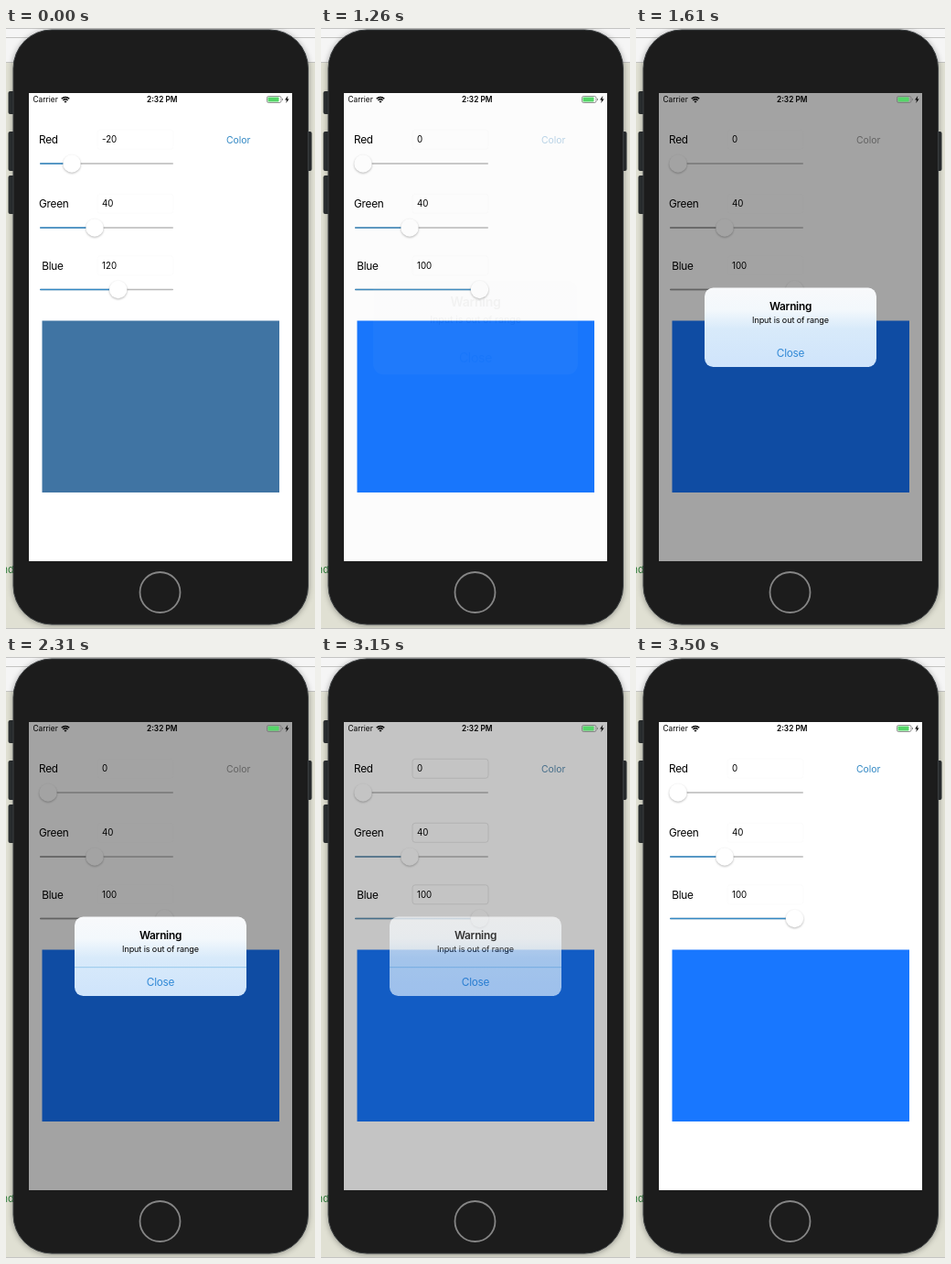
An HTML page that plays this animation: 338 by 656 pixels, repeating every 3640 ms.

```html
<!DOCTYPE html>
<html lang="en">
<head>
<meta charset="utf-8">
<title>Color sliders</title>
<style>
  @property --done { syntax: "<number>"; inherits: true; initial-value: 0; }
  @property --show { syntax: "<number>"; inherits: true; initial-value: 0; }
  @property --zoom { syntax: "<number>"; inherits: true; initial-value: 1.2; }
  @property --gray { syntax: "<number>"; inherits: true; initial-value: 0; }
  @property --press { syntax: "<number>"; inherits: true; initial-value: 1; }
  @property --edge { syntax: "<number>"; inherits: true; initial-value: 0.1; }
  @property --line { syntax: "<number>"; inherits: true; initial-value: 0; }

  html, body { margin: 0; width: 100%; height: 100%; overflow: hidden; }

  /* The screen redraws every 70 ms, so each value is held until the next. */
  svg {
    display: block; width: 100%; height: 100%;
    font-family: Inter, sans-serif;
    --tint: color-mix(in srgb, #999 calc(var(--gray) * 100%), #3288c4);
    animation: play 3640ms step-end infinite;
  }
  @keyframes play {
    0%      { --done: 0; --show: 0; --zoom: 1.2; --gray: 0; --press: 1; --edge: .1; --line: 0; }
    28.846% { --press: .35; }                                            /* 1050 ms */
    34.615% { --done: 1; --show: .03; --zoom: 1.19; --gray: .1; --press: .35; --edge: .1; }
    36.538% { --done: 1; --show: .29; --zoom: 1.14; --gray: .6; --press: .5; --edge: .4; }
    38.462% { --done: 1; --show: .62; --zoom: 1.07; --gray: .85; --press: .8; --edge: .4; }
    40.385% { --done: 1; --show: .87; --zoom: 1.02; --gray: 1; --press: 1; --edge: .2; }
    42.308% { --done: 1; --show: 1; --zoom: 1; --gray: 1; --press: 1; --edge: .1; --line: 0; }
    46.154% { --done: 1; --show: 1; --zoom: 1; --gray: 1; --press: 1; --edge: .1; --line: 1; }
    84.615% { --done: 1; --show: 1; --zoom: 1; --gray: 1; --press: 1; --edge: .2; --line: 1; }
    86.538% { --done: 1; --show: .64; --zoom: 1; --gray: .4; --press: 1; --edge: .8; --line: 1; }
    88.462% { --done: 1; --show: .31; --zoom: 1; --gray: 0; --press: 1; --edge: 1; --line: 1; }
    90.385% { --done: 1; --show: .13; --zoom: 1; --gray: 0; --press: 1; --edge: .7; --line: 1; }
    92.308% { --done: 1; --show: .05; --zoom: 1; --gray: 0; --press: 1; --edge: .4; --line: 1; }
    94.231%, 100% { --done: 1; --show: 0; --zoom: 1; --gray: 0; --press: 1; --edge: .1; --line: 1; }
  }

  .label { font-size: 11.8px; letter-spacing: -.25px; }
  .value { font-size: 9.74px; }
  .status { font-size: 8.35px; }
  .before { opacity: calc(1 - var(--done)); }
  .after { opacity: var(--done); }
  .field { fill: none; stroke: #e2e2e2; opacity: var(--edge); }
  .fill { fill: var(--tint); width: calc((var(--from) + (var(--to) - var(--from)) * var(--done) - 37) * 1px); }
  .thumb {
    fill: #fff;
    transform: translateX(calc((var(--from) + (var(--to) - var(--from)) * var(--done)) * 1px));
    filter: drop-shadow(0 1px .8px rgba(0, 0, 0, .28));
  }
  .color { font-size: 10.4px; fill: var(--tint); opacity: var(--press); }
  .swatch { fill: color-mix(in srgb, #1877ff calc(var(--done) * 100%), #4074a3); }
  .dim { opacity: calc(var(--show) * .36); }
  .alert {
    opacity: min(1, calc(var(--show) * 1.15));
    transform: scale(var(--zoom)); transform-origin: 169px 326.7px;
    text-anchor: middle;
  }
  .rule { opacity: var(--line); }
  .body { filter: drop-shadow(0 1px 3px rgba(0, 0, 0, .35)); }
</style>
</head>
<body>
<svg viewBox="0 0 338 656" preserveAspectRatio="none">
  <defs>
    <linearGradient id="glass" x2="0" y2="1">
      <stop offset="0" stop-color="#f8f9fb"/>
      <stop offset=".28" stop-color="#f3f8fc"/>
      <stop offset=".52" stop-color="#d8eafa"/>
      <stop offset="1" stop-color="#cfe4fb"/>
    </linearGradient>
  </defs>

  <rect width="338" height="656" fill="#e0e0d3"/>
  <rect width="338" height="37" fill="#f5f5f5"/>
  <path d="M0 .5H338M0 10.5H338M0 37.5H338M0 655.5H338" stroke="#c4c4c2"/>
  <text x="-4.5" y="595" font-size="11" fill="#2f7d3a">nd</text>

  <g fill="#2c3032">
    <rect x="2.5" y="69" width="8" height="25" rx="2"/>
    <rect x="2.5" y="113" width="8" height="43" rx="2"/>
    <rect x="2.5" y="161" width="8" height="42" rx="2"/>
    <rect x="328" y="113" width="6.5" height="43" rx="2"/>
  </g>
  <rect class="body" x="8" y="2" width="322.5" height="649" rx="42" fill="#1c1c1c" stroke="#3b3f41"/>
  <circle cx="168.5" cy="616" r="22" fill="none" stroke="#858585" stroke-width="1.8"/>

  <rect x="25" y="71" width="288" height="511" fill="#fff"/>
  <rect class="swatch" x="39.5" y="319.5" width="259.5" height="187.5"/>
  <g id="rows"></g>
  <text class="color" x="241" y="125.5">Color</text>
  <rect class="dim" x="25" y="71" width="288" height="511"/>

  <g class="status">
    <text x="29.5" y="81">Carrier</text>
    <text x="154" y="81" font-weight="600">2:32 PM</text>
    <path d="M60.7 77.2a6.2 6.2 0 0 1 8.6 0M62.4 79a3.8 3.8 0 0 1 5.2 0" fill="none" stroke="#000" stroke-width="1.4"/>
    <path d="M63.5 80.2a2.2 2.2 0 0 1 3 0L65 81.8Z"/>
    <rect x="285.5" y="74.5" width="15.5" height="7" rx="1.8" fill="none" stroke="#777" stroke-width=".8"/>
    <rect x="286.5" y="75.5" width="12" height="5" rx=".8" fill="#55d668"/>
    <path d="M302 76.7v2.6q1-.4 1-1.3t-1-1.3" fill="#777"/>
    <path d="M308.3 74l-3.2 4.5h2l-.9 3.6 3.4-4.7h-2.1Z"/>
  </g>

  <g class="alert">
    <rect x="75" y="283.5" width="188" height="86.5" rx="9.5" fill="url(#glass)"/>
    <path class="rule" d="M75 338.7H263" stroke="#8fc6ea" stroke-width=".9"/>
    <text x="169" y="308" class="label" font-weight="600">Warning</text>
    <text x="169" y="322.4" font-size="9.05" letter-spacing="-.1">Input is out of range</text>
    <text x="169" y="359" class="label" fill="#3189d6">Close</text>
  </g>
</svg>
<script>
  const rows = [
    { name: "Red", x: 36, base: 126, track: 148, values: ["-20", "0"], thumb: [72, 46] },
    { name: "Green", x: 36, base: 196, track: 218, values: ["40", "40"], thumb: [97, 97] },
    { name: "Blue", x: 39.3, base: 263.5, track: 285.5, values: ["120", "100"], thumb: [122.7, 173.5] },
  ];
  const bar = (y, attrs) => `<rect x="37" y="${y - 0.7}" height="1.4" ${attrs}/>`;
  const value = (text, y, state) => `<text class="value ${state}" x="105" y="${y}">${text}</text>`;

  document.getElementById("rows").innerHTML = rows.map(({ name, x, base, track, values, thumb }) => `
    <g style="--from:${thumb[0]};--to:${thumb[1]}">
      <text class="label" x="${x}" y="${base}">${name}</text>
      <rect class="field" x="100" y="${base - 14.7}" width="83" height="21" rx="3"/>
      ${value(values[0], base - 0.9, "before")}
      ${value(values[1], base - 0.9, "after")}
      ${bar(track, 'width="146" rx=".7" fill="#b9b9b9"')}
      ${bar(track, 'class="fill" rx=".7"')}
      <circle class="thumb" cy="${track}" r="9.7"/>
    </g>`).join("");
</script>
</body>
</html>
```
